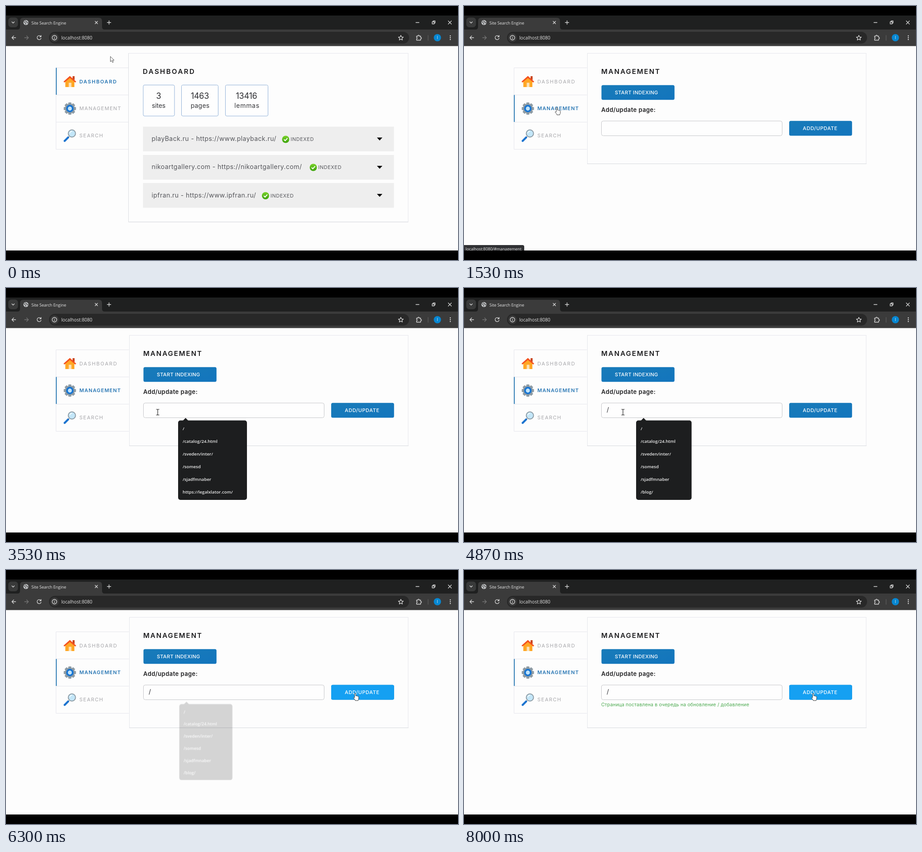
These frames come from a looping animation (998x561 px, 8.03 s). An HTML page:

```html
<!DOCTYPE html>
<html lang="en">
<head>
<meta charset="utf-8">
<title>Site Search Engine</title>
<style>
html, body { margin: 0; width: 100%; height: 100%; overflow: hidden; background: #000; }
svg { display: block; }
text { font: 400 14px Inter, sans-serif; fill: #55565b; white-space: pre; }
.ui, .ui text { font: 400 9.3px "Open Sans", "Noto Sans", sans-serif; fill: #e3e3e3; }
.line { fill: none; stroke: #d8d8d8; stroke-width: 1.3; stroke-linecap: round; stroke-linejoin: round; }
.edge { fill: none; stroke: #e5e6ec; }
.mid { text-anchor: middle; }
.title { font-size: 15px; font-weight: 600; fill: #1b1b1d; }
.nav { font-size: 11px; fill: #a7a7ab; }
.on { font-weight: 600; fill: #2977b4; }
.num { font-size: 18px; letter-spacing: -.25px; fill: #2c2d31; }
.unit { font-size: 14px; fill: #36373b; }
.site { letter-spacing: .43px; }
.tag { font-size: 11px; letter-spacing: .5px; }
.btn { font-size: 11px; font-weight: 500; fill: #fff; }
.list text { font-size: 9.7px; font-weight: 600; fill: #eee; }

/* Every track shares one loop */
.dash, .mgmt, .status, .hover, .wide, .narrow, .typed, .note, .arrow, .hand, .beam {
  animation: 8.03s step-end infinite;
}
.dash { animation-name: dash; }
.mgmt { animation-name: mgmt; }
.status { animation-name: status; }
.hover { animation-name: hover; }
.wide { animation-name: wide; }
.narrow, .typed { animation-name: typed; }
.note { animation-name: note; }
.arrow { animation-name: arrow; }
.hand { animation-name: hand; }
.beam { animation-name: beam; }
.list { transform-origin: 441px 377.5px; animation: list 8.03s linear infinite; }
.pointer { animation: move 8.03s ease-in-out infinite; }

@keyframes dash { 0% { opacity: 1 } 13.7%, 100% { opacity: 0 } }
@keyframes mgmt { 0% { opacity: 0 } 13.7%, 100% { opacity: 1 } }
@keyframes status { 0% { opacity: 0 } 11.2% { opacity: 1 } 27.5%, 100% { opacity: 0 } }
@keyframes hover { 0% { opacity: 0 } 72.3%, 100% { opacity: 1 } }
@keyframes wide { 0% { opacity: 0 } 39.9% { opacity: 1 } 54.8%, 100% { opacity: 0 } }
@keyframes typed { 0% { opacity: 0 } 54.8%, 100% { opacity: 1 } }
@keyframes note { 0% { opacity: 0 } 86%, 100% { opacity: 1 } }
@keyframes list {
  0%, 39.89% { opacity: 0; transform: none }
  39.9%, 76.84% { opacity: 1; transform: none }
  78.83%, 100% { opacity: 0; transform: scale(.947) }
}
@keyframes arrow { 0% { opacity: 1 } 3.6% { opacity: 0 } 26.1% { opacity: 1 } 27.6% { opacity: 0 } 72% { opacity: 1 } 72.3%, 100% { opacity: 0 } }
@keyframes hand { 0% { opacity: 0 } 3.6% { opacity: 1 } 26.1% { opacity: 0 } 72.3%, 100% { opacity: 1 } }
@keyframes beam { 0% { opacity: 0 } 27.6% { opacity: 1 } 72%, 100% { opacity: 0 } }
@keyframes move {
  0%, 1.87% { transform: translate(230px, 111px) }
  7.47%, 21.8% { transform: translate(205px, 224px) }
  30.5%, 46.1% { transform: translate(335px, 274px) }
  49.8%, 66% { transform: translate(351px, 274px) }
  74.1%, 100% { transform: translate(771px, 272px) }
}
</style>
</head>
<body>
<svg width="998" height="561" viewBox="0 0 998 561">
  <defs>
    <linearGradient id="blue" x2="1" y2="1"><stop stop-color="#187bb9"/><stop offset="1" stop-color="#1375bd"/></linearGradient>
    <linearGradient id="green" x2="0" y2="1"><stop stop-color="#7ad22b"/><stop offset="1" stop-color="#3ca30c"/></linearGradient>
    <g id="check">
      <circle r="8" fill="url(#green)"/>
      <path d="M-3.8.2-1 3 4-2.7" fill="none" stroke="#fff" stroke-width="2"/>
    </g>
    <g id="row">
      <rect width="554" height="54.5" fill="#eeeeee"/>
      <path d="M516.5 24h12l-6 6.5z" fill="#000"/>
    </g>
    <path id="tooth" d="M-3-13.5h6l1 5h-8z"/>
  </defs>

  <!-- Browser -->
  <rect width="998" height="561"/>
  <rect y="88" width="998" height="452" fill="#fdfdfd"/>
  <rect y="21" width="998" height="32" fill="#1f2020"/>
  <rect y="52" width="998" height="36.5" fill="#3b3b3b"/>
  <path d="M25 52q6 0 6-6V33q0-7 7-7H205q7 0 7 7v13q0 6 6 6z" fill="#3b3b3b"/>
  <rect x="5" y="25.500" width="21.500" height="21.500" rx="6.500" fill="#393a3a"/>
  <rect x="95" y="57" width="795" height="26" rx="13" fill="#282828"/>
  <circle cx="107" cy="70" r="9.500" fill="#3a3a3a"/>
  <g class="line">
    <path d="M13 35l2.700 2.700 2.700-2.700M196.800 33.800l5.400 5.400m0-5.400l-5.400 5.400M223.500 36.500h8m-4-4v8"/>
    <path d="M905 36.500h7M941 35h4.500v4.500H941zM943 35v-2h4.500v4.500h-2M976.500 33l7 7m0-7l-7 7"/>
    <path d="M21.500 70H13m4-4l-4 4 4 4M77 67.300a4.500 4.500 0 1 0 .5 4M77.500 65v3H74.500"/>
    <path d="M41 70h8.500m-4-4l4 4-4 4" stroke="#747474"/>
    <circle cx="107" cy="70" r="5"/><path d="M107 69.700v2.500M107 67.400v.1"/>
    <path d="M871.800 64.800l1.600 3.500 3.800.4-2.800 2.600.8 3.800-3.400-1.900-3.400 1.900.8-3.800-2.800-2.600 3.800-.4z"/>
    <path d="M906.500 66.500h3v-.5a1.500 1.500 0 0 1 3 0v.5h3v3h.5a1.500 1.500 0 0 1 0 3h-.5v3h-9v-3a1.500 1.500 0 0 0 0-3z"/>
    <path d="M932 65v11" stroke="#5c5c5c"/>
  </g>
  <circle cx="44" cy="36.500" r="5.500" fill="#c9cbcd"/>
  <path d="M39.500 35q3 0 3 2.500t2 3M42 32q1 2 3 2t1 2 3 1" fill="none" stroke="#4a4b4c" stroke-width="1.400"/>
  <g fill="#e0e0e0"><circle cx="981" cy="66" r="1.200"/><circle cx="981" cy="70" r="1.200"/><circle cx="981" cy="74" r="1.200"/></g>
  <circle cx="952.500" cy="70" r="8" fill="#0787d2"/>
  <g class="ui">
    <text x="56" y="40.500" style="letter-spacing:-.13px">Site Search Engine</text>
    <text x="122" y="73.500" style="font-size:10.200px">localhost:8080</text>
    <text x="952.500" y="73.300" class="mid">I</text>
  </g>

  <!-- Dashboard view -->
  <g class="dash">
    <path class="edge" d="M270.500 136.500H110.500v180H270.500M110.500 196.500h160M110.500 256.500h160"/>
    <rect class="edge" x="270.500" y="104.500" width="617.500" height="372.500"/>
    <path d="M270.500 477V104.500M270.500 477H888" stroke="#dcdee2"/>
    <rect x="110" y="136.500" width="2" height="59.500" fill="#327eb6"/>
    <text class="nav on" x="162" y="170.500" style="letter-spacing:1.600px">DASHBOARD</text>
    <text class="nav" x="162" y="230.300" style="letter-spacing:1.300px">MANAGEMENT</text>
    <text class="title" x="302" y="149.500" style="letter-spacing:2.450px">DASHBOARD</text>
    <g fill="#fefefe" stroke="#8fb0d8">
      <rect x="303" y="174.500" width="69" height="68.500" rx="3"/>
      <rect x="387.500" y="174.500" width="81" height="68.500" rx="3"/>
      <rect x="484.500" y="174.500" width="94" height="68.500" rx="3"/>
    </g>
    <g class="mid">
      <text class="num" x="337" y="204.500">3</text>
      <text class="num" x="428" y="204.500">1463</text>
      <text class="num" x="531" y="204.500">13416</text>
      <text class="unit" x="337" y="225" style="letter-spacing:-.200px">sites</text>
      <text class="unit" x="428.500" y="225" style="letter-spacing:.200px">pages</text>
      <text class="unit" x="532" y="225" style="letter-spacing:.700px">lemmas</text>
    </g>
    <use href="#row" x="302.500" y="266.500"/>
    <use href="#row" x="302.500" y="329"/>
    <use href="#row" x="302.500" y="391"/>
    <text class="site" x="321.500" y="298">playBack.ru - https://www.playback.ru/</text>
    <text class="site" x="321.500" y="360.300">nikoartgallery.com - https://nikoartgallery.com/</text>
    <text class="site" x="321.500" y="422.500">ipfran.ru - https://www.ipfran.ru/</text>
    <use href="#check" x="617.500" y="294.500"/><text class="tag" x="628.500" y="298">INDEXED</text>
    <use href="#check" x="678.500" y="356.500"/><text class="tag" x="689.500" y="360.300">INDEXED</text>
    <use href="#check" x="573" y="419"/><text class="tag" x="584" y="422.700">INDEXED</text>
  </g>

  <!-- Management view -->
  <g class="mgmt">
    <path class="edge" d="M271.500 136.500H110.500v180H271.500M110.500 196.500h161M110.500 256.500h161"/>
    <rect class="edge" x="272.500" y="104.500" width="615.500" height="244"/>
    <path d="M272 348.500H888.500" stroke="#d6d8de"/>
    <rect x="110" y="196.500" width="2" height="59.500" fill="#327eb6"/>
    <text class="nav" x="162" y="170.500" style="letter-spacing:1.800px">DASHBOARD</text>
    <text class="nav on" x="162" y="230.300" style="letter-spacing:1.070px">MANAGEMENT</text>
    <text class="title" x="303" y="149.500" style="letter-spacing:2px">MANAGEMENT</text>
    <rect x="303.500" y="174.700" width="161.300" height="32.500" rx="3.500" fill="url(#blue)"/>
    <text class="btn" x="333" y="194.500" style="letter-spacing:.300px">START INDEXING</text>
    <text x="303" y="234" style="font-size:13px;font-weight:600;letter-spacing:.450px;fill:#1d1d1f">Add/update page:</text>
    <rect x="303.500" y="254" width="399" height="32.500" rx="4" fill="#fefefe" stroke="#c5c6c9"/>
    <rect x="718" y="253.800" width="138.800" height="32.700" rx="3.500" fill="url(#blue)"/>
    <rect class="hover" x="718" y="253.800" width="138.800" height="32.700" rx="3.500" fill="#15a0f2"/>
    <text class="btn" x="748" y="273.500" style="letter-spacing:.600px">ADD/UPDATE</text>
    <text class="typed" x="315" y="274.300" style="fill:#303136">/</text>
    <text class="note" x="303" y="301" style="font-size:10.500px;letter-spacing:.160px;fill:#4caa50">Страница поставлена в очередь на обновление / добавление</text>
  </g>

  <!-- Menu icons -->
  <path d="M131 166v13h20v-13l-10-9z" fill="#ffa726"/>
  <path d="M138.500 179v-9.500h6V179z" fill="#fbe2b8"/>
  <path d="M147 155h4.500v8H147z" fill="#c9461f"/>
  <path d="M127 167l14-12.500 14 12.500-2 2-12-10-12 10z" fill="#f4511e"/>
  <g transform="translate(141 226.500)">
    <g fill="#8e9ba4">
      <use href="#tooth"/><use href="#tooth" transform="rotate(45)"/><use href="#tooth" transform="rotate(90)"/><use href="#tooth" transform="rotate(135)"/>
      <use href="#tooth" transform="rotate(180)"/><use href="#tooth" transform="rotate(225)"/><use href="#tooth" transform="rotate(270)"/><use href="#tooth" transform="rotate(315)"/>
      <circle r="10.700"/>
    </g>
    <circle r="6.300" fill="#fdfdfd" stroke="#1976d2" stroke-width="4"/>
    <circle r="4" fill="#bfe3fa"/>
  </g>
  <path d="M139 288.500l-3 3" stroke="#7d8b94" stroke-width="3"/>
  <path d="M137 290.500l-7.500 7.500" stroke="#1c73cf" stroke-width="4.500" stroke-linecap="round"/>
  <circle cx="145.500" cy="281.500" r="8" fill="#c3e6f8" stroke="#8e9ca5" stroke-width="2"/>
  <path d="M141 281a5 5 0 0 1 5-4.500" fill="none" stroke="#fff" stroke-width="1.500"/>
  <text class="nav" x="162" y="290.300" style="letter-spacing:1.500px">SEARCH</text>

  <!-- Suggestions -->
  <g class="list ui">
    <path d="M390 293.500l6.500-6.500 6.500 6.500z" fill="#1d1e1f"/>
    <rect class="narrow" x="380" y="292.500" width="122.500" height="175.500" rx="5" fill="#1d1e1f"/>
    <rect class="wide" x="380" y="292.500" width="152" height="175.500" rx="5" fill="#1d1e1f"/>
    <text x="390" y="314">/</text>
    <text x="390" y="342">/catalog/24.html</text>
    <text x="390" y="370">/sveden/inter/</text>
    <text x="390" y="398">/somesd</text>
    <text x="390" y="426">/sjadfmnaber</text>
    <text class="wide" x="390" y="454">https://legalxlator.com/</text>
    <text class="narrow" x="390" y="454">/blog/</text>
  </g>

  <g class="status ui">
    <path d="M0 528h129q4 0 4 4v8H0z" fill="#303134"/>
    <text x="3.500" y="540" style="font-size:9px;letter-spacing:-.100px">localhost:8080/#management</text>
  </g>
  <rect y="540" width="998" height="21"/>

  <g class="pointer">
    <path class="arrow" d="M.5.500v11.500l2.700-2.500 1.900 4.300 2-.9-1.900-4.200h3.600z" fill="#fff" stroke="#444" stroke-width=".9"/>
    <path class="hand" d="M-1.200 8.500V1Q0-.8 1.200 1v5q1.400-.8 2.100.4 1.500-.7 2.200.5 2-.3 2.200 1.400v3.700q0 1.700-1.200 3v1.500H0v-1.300L-3.700 10.500q-.3-2.200 2.500-.3z" fill="#fff" stroke="#333" stroke-width=".9"/>
    <path class="beam" d="M-3.500-6h2.500q1 0 1 1 0-1 1-1h2.500M0-5v10.500M-3.500 6.500H-1q1 0 1-1 0 1 1 1h2.500" fill="none" stroke="#222" stroke-width="1.200"/>
  </g>
</svg>
</body>
</html>
```
